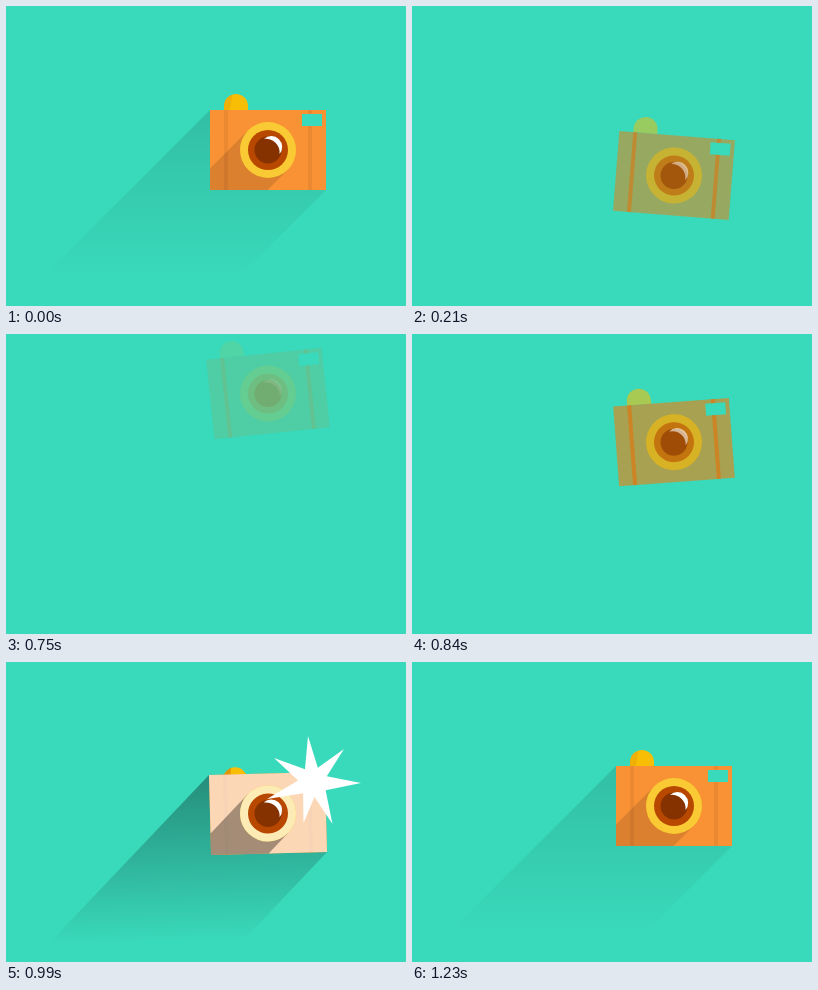
These frames come from a looping animation (400x300 px, 1260 ms). An HTML page:

```html
<!DOCTYPE html>
<html lang="en">
<head>
<meta charset="utf-8">
<title>Camera flash</title>
<style>
  html, body { margin: 0; width: 100%; height: 100%; overflow: hidden; background: #39d9bb; }
  svg { display: block; width: 100%; height: 100%; }
</style>
</head>
<body>
<svg viewBox="0 0 400 300">
  <defs>
    <linearGradient id="fade" gradientUnits="userSpaceOnUse" x1="0" y1="-40" x2="0" y2="125">
      <stop offset="0" stop-color="#000"/>
      <stop offset="1" stop-color="#000" stop-opacity="0"/>
    </linearGradient>
    <path id="case" fill-rule="evenodd" d="M-58-40H58V40H-58ZM34-36V-24H54V-36Z"/>
    <path id="button" d="M-44-40V-44a12 12 0 0 1 24 0V-40Z"/>
    <clipPath id="buttonClip"><use href="#button"/></clipPath>
  </defs>
  <!-- The lens centre is the origin of the camera. -->
  <g id="camera">
    <path class="shade" fill="url(#fade)" d="M-58-40L58 40L-28 126H-224Z"/>
    <g id="shutter">
      <use href="#button" fill="#f8be06"/>
      <path class="shade" clip-path="url(#buttonClip)" fill="#b84800" d="M-46-60H-35L-38-40H-46Z"/>
    </g>
    <use href="#case" fill="#f67a08"/>
    <path fill="#e66f06" d="M-44-40h4V40h-4ZM40-40h4v4h-4ZM40-24h4V40h-4Z"/>
    <use class="glow" href="#case" fill="#fff"/>
    <path class="shade" d="M-19.8-19.8L19.8 19.8L-.4 40H-58V18.4Z"/>
    <circle r="28" fill="#f8be06"/>
    <circle class="glow" r="28" fill="#fff"/>
    <circle r="20" fill="#b84800"/>
    <circle r="13.5" fill="#853200"/>
    <path id="glint" fill="#fff" d="M-4-11A10.8 10.8 0 0 1 11.5 4A13.5 13.5 0 0 0-4-11Z"/>
  </g>
  <path id="star" fill="#fff"/>
</svg>
<script>
  const LOOP = 1260, STEP = 30;
  const CENTER_X = 262, REST_Y = 144;
  const byId = id => document.getElementById(id);
  const camera = byId('camera'), shutter = byId('shutter'), star = byId('star');
  const shades = document.querySelectorAll('.shade');
  const glows = document.querySelectorAll('.glow');

  const clamp = v => Math.min(1, Math.max(0, v));
  const span = (t, from, to) => clamp((t - from) / (to - from));
  const smooth = u => u * u * (3 - 2 * u);

  // Linear interpolation through [time, value] pairs.
  function track(t, keys) {
    if (t <= keys[0][0]) return keys[0][1];
    for (let i = 1; i < keys.length; i++) {
      const [t0, v0] = keys[i - 1], [t1, v1] = keys[i];
      if (t <= t1) return v0 + (v1 - v0) * (t - t0) / (t1 - t0);
    }
    return keys[keys.length - 1][1];
  }

  function starPath() {
    const tips = [[-5, -46], [31, -33], [48, 1], [19.5, 42], [-9.5, 41], [-46, 17], [-39, -24]];
    const points = tips.flatMap(([x, y], i) => {
      const [nx, ny] = tips[(i + 1) % tips.length];
      const a = Math.atan2(y, x);
      const gap = (Math.atan2(ny, nx) - a + 2 * Math.PI) % (2 * Math.PI);
      const mid = a + gap / 2;
      return [[x, y], [15 * Math.cos(mid), 15 * Math.sin(mid)]];
    });
    return 'M' + points.map(p => p.map(v => v.toFixed(1)).join(' ')).join('L') + 'Z';
  }

  function leaving(t) {
    const y = t <= 120
      ? REST_Y - 16.5 * (1 - (1 - t / 120) ** 2)
      : 127.5 + 116.5 * ((t - 120) / 150) ** 2;
    const left = 1 - span(t, 0, 90);
    return {
      y, angle: t * 0.0215, alpha: 1 - span(t, 120, 300),
      glow: 0.18 * left, shade: 0.12 * left, press: 0, burst: 0
    };
  }

  function arriving(t) {
    const y = t < 990
      ? 151.5 - 111 * (1 - span(t, 720, 990)) ** 1.6
      : 151.5 - 7.5 * smooth(span(t, 990, 1140));
    const lit = t >= 990;
    return {
      y, angle: -6.5 * (1 - span(t, 720, 1070)), alpha: span(t, 727, 920),
      glow: lit ? track(t, [[990, 0.7], [1230, 0.18]]) : 0,
      shade: lit ? track(t, [[990, 0.35], [1230, 0.12]]) : 0,
      press: track(t, [[900, 0], [960, 9], [990, 9], [1080, 0]]),
      burst: track(t, [[930, 0], [960, 0.5], [990, 1], [1020, 1.27], [1140, 0]])
    };
  }

  function render(time) {
    const t = Math.floor((time % LOOP) / STEP) * STEP;
    const s = t < 720 ? leaving(t) : arriving(t);
    camera.setAttribute('transform', `translate(${CENTER_X} ${s.y}) rotate(${s.angle})`);
    camera.setAttribute('fill-opacity', s.alpha);
    camera.setAttribute('visibility', s.alpha > 0 ? 'visible' : 'hidden');
    shutter.setAttribute('transform', `translate(0 ${s.press})`);
    shades.forEach(el => el.setAttribute('fill-opacity', s.shade));
    glows.forEach(el => el.setAttribute('fill-opacity', s.glow));
    star.setAttribute('transform', `translate(${CENTER_X + 45} ${s.y - 31.5}) scale(${s.burst})`);
    star.setAttribute('visibility', s.burst > 0 ? 'visible' : 'hidden');
  }

  star.setAttribute('d', starPath());
  const start = performance.now();
  function tick() {
    render(performance.now() - start);
    requestAnimationFrame(tick);
  }
  tick();
</script>
</body>
</html>
```
